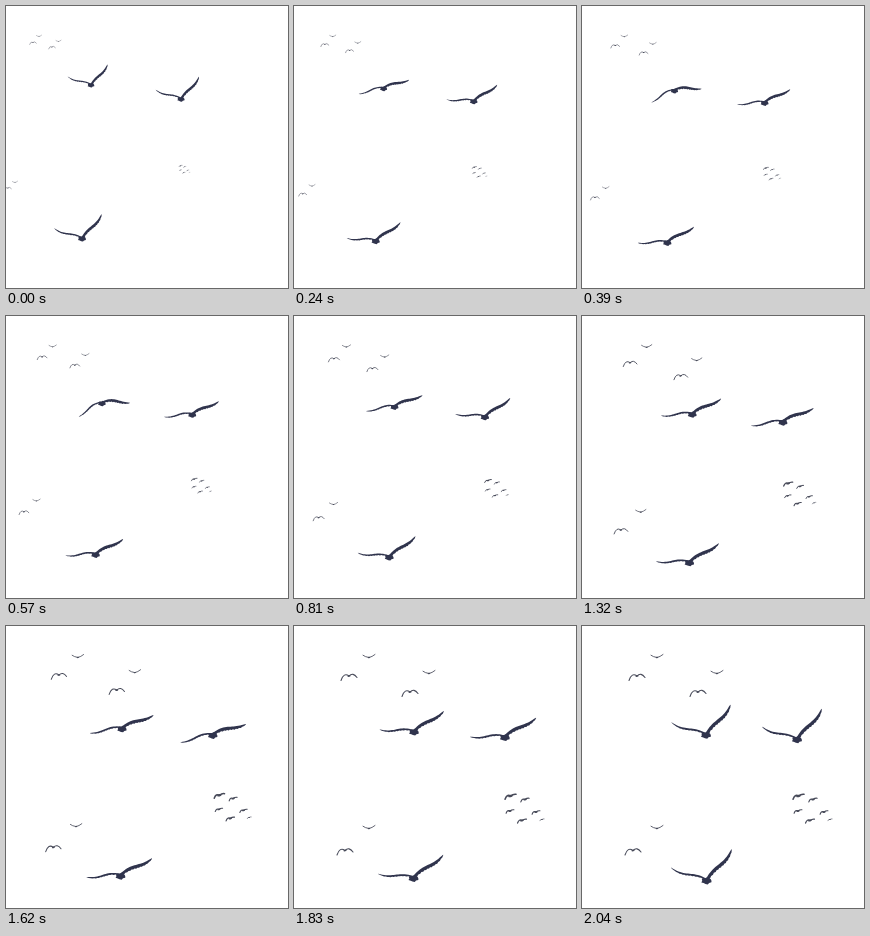
Animation of 282 by 282 pixels, one loop 2.07 s. Source, as an HTML page with a canvas:

```html
<!DOCTYPE html>
<html lang="en">
<head>
<meta charset="utf-8">
<title>Birds in flight</title>
<style>
  html, body { margin: 0; width: 100%; height: 100%; overflow: hidden; background: #fff; }
  canvas { display: block; width: 282px; height: 282px; }
</style>
</head>
<body>
<canvas id="sky"></canvas>
<script>
const SIZE = 282, LOOP = 2070, STEP = 30;
const GLIDE = 1750;   // far birds stop drifting here
const BEAT = 1020;    // one wing beat of a near bird
const INK = '#30344d', FAR_INK = '#474a59';
const canvas = document.getElementById('sky');
const ctx = canvas.getContext('2d');
const ratio = window.devicePixelRatio || 1;
canvas.width = canvas.height = SIZE * ratio;

const mix = (a, b, p) => a + (b - a) * p;

// dips: how far the wings swing down in each beat, in degrees
const nearBirds = [
  { from: [85, 79], to: [124, 109], scale: [0.71, 1.05], dips: [51, 29] },
  { from: [175, 93], to: [215, 113.5], scale: [0.77, 1.06], dips: [25, 34] },
  { from: [76, 232.5], to: [124.5, 254.5], scale: [0.84, 1.08], dips: [22, 23] }
];

function fillShape(points) {
  ctx.beginPath();
  points.forEach(([x, y]) => ctx.lineTo(x, y));
  ctx.closePath();
  ctx.fill();
}

// Tapered S-curved wing: raised near the shoulder, sagging further out.
// side is -1 or 1, angle is degrees below the horizon.
function wing(side, angle, length, bend, half) {
  const a = angle * Math.PI / 180;
  const rootX = 1, rootY = -1.4;
  const dx = length * Math.cos(a) - rootX, dy = length * Math.sin(a) - rootY;
  const span = Math.hypot(dx, dy), front = [], rear = [], n = 20;
  for (let i = 0; i <= n; i++) {
    const u = i / n, v = 1 - u;
    const along = span * (u + 0.3 * u * v * (v - u));
    const sag = 3 * u * v * (v * (bend - 4) + u * (bend + 4));
    const w = half * (Math.pow(v, 0.6) * (0.6 + 1.1 * u) + 0.12);
    const r = w * (i % 2 ? 1.2 : 0.8);
    const place = off => [
      side * (rootX + (along * dx - off * dy) / span),
      rootY + (along * dy + off * dx) / span
    ];
    front.push(place(sag - w));
    rear.unshift(place(sag + r));
  }
  fillShape(front.concat(rear));
}

function torso() {
  const points = [];
  for (let i = 0; i < 14; i++) {
    const a = i / 14 * Math.PI * 2, r = 1 + 0.16 * Math.sin(i * 2.4);
    points.push([4.6 * r * Math.cos(a), 0.2 + 3.1 * r * Math.sin(a)]);
  }
  fillShape(points);
}

function drawNear({ from, to, scale, dips }, t) {
  const p = t / (2 * BEAT), s = mix(scale[0], scale[1], p);
  const beat = Math.pow(Math.abs(Math.sin(Math.PI * t / BEAT)), 1.15);
  const swing = dips[t < BEAT ? 0 : 1] * beat;
  const reach = 1 - 0.06 * beat;
  const bend = 1.6 - 0.08 * swing;
  ctx.save();
  ctx.translate(mix(from[0], to[0], p), mix(from[1], to[1], p));
  ctx.scale(s, s);
  ctx.fillStyle = INK;
  wing(-1, swing - 20, 35 * reach, bend, 1.05);
  wing(1, swing - 51, 37 * reach, bend, 1.9);
  torso();
  ctx.restore();
}

// Far birds differ only in wing span, tip heights and arch
const arch = { span: 8, left: 4.5, right: 1.5, lift: -4, weight: 1.05 };
const vee = { span: 6, left: -2.2, right: -3, lift: -0.6, weight: 0.85 };
const dart = { span: 5.2, left: 3, right: -1.6, lift: -2, weight: 1.5 };

function drawFar(x, y, s, { span, left, right, lift, weight }) {
  ctx.save();
  ctx.translate(x, y);
  ctx.scale(s, s);
  ctx.lineWidth = weight;
  ctx.beginPath();
  ctx.moveTo(-span, left);
  ctx.quadraticCurveTo(-span * 0.65, lift, 0, 0);
  ctx.quadraticCurveTo(span * 0.5, lift, span, right);
  ctx.stroke();
  ctx.beginPath();
  ctx.ellipse(0, 0, weight * 1.5, weight * 0.8, -0.2, 0, Math.PI * 2);
  ctx.fill();
  ctx.restore();
}

// Three pairs, each an arched bird followed by a smaller one
const pairs = [
  { lead: [[27, 36.5], [55, 50]], mate: [[33, 30.5], [75, 31.5]] },
  { lead: [[46, 41], [116, 66]], mate: [[52.5, 35.5], [135, 47.5]] },
  { lead: [[2, 182], [51, 224.5]], mate: [[9, 176.5], [75, 202.5]] }
];
// Places and sizes inside the little flock
const flock = [
  [-14, -11.5, 1.05], [0.5, -8, 0.8], [-14.5, 3.5, 0.75],
  [11.5, 4.5, 0.75], [-2.5, 13, 0.85], [17.5, 12, 0.4]
];

function draw(t) {
  ctx.setTransform(ratio, 0, 0, ratio, 0, 0);
  ctx.fillStyle = '#fff';
  ctx.fillRect(0, 0, SIZE, SIZE);

  const p = Math.min(1, t / GLIDE);
  const between = ([a, b]) => [mix(a[0], b[0], p), mix(a[1], b[1], p)];
  const size = mix(0.42, 1, p);
  ctx.fillStyle = ctx.strokeStyle = FAR_INK;
  ctx.lineCap = ctx.lineJoin = 'round';
  for (const { lead, mate } of pairs) {
    drawFar(...between(lead), size, arch);
    drawFar(...between(mate), size, vee);
  }
  const spread = mix(0.28, 1, p);
  const [x, y] = between([[178.5, 163], [230.5, 181.5]]);
  for (const [dx, dy, s] of flock) {
    drawFar(x + dx * spread, y + dy * spread, s * spread, dart);
  }
  for (const bird of nearBirds) drawNear(bird, t);
}

const start = performance.now();
function tick() {
  const t = (performance.now() - start) % LOOP;
  draw(Math.floor(t / STEP) * STEP);
  requestAnimationFrame(tick);
}
tick();
</script>
</body>
</html>
```
